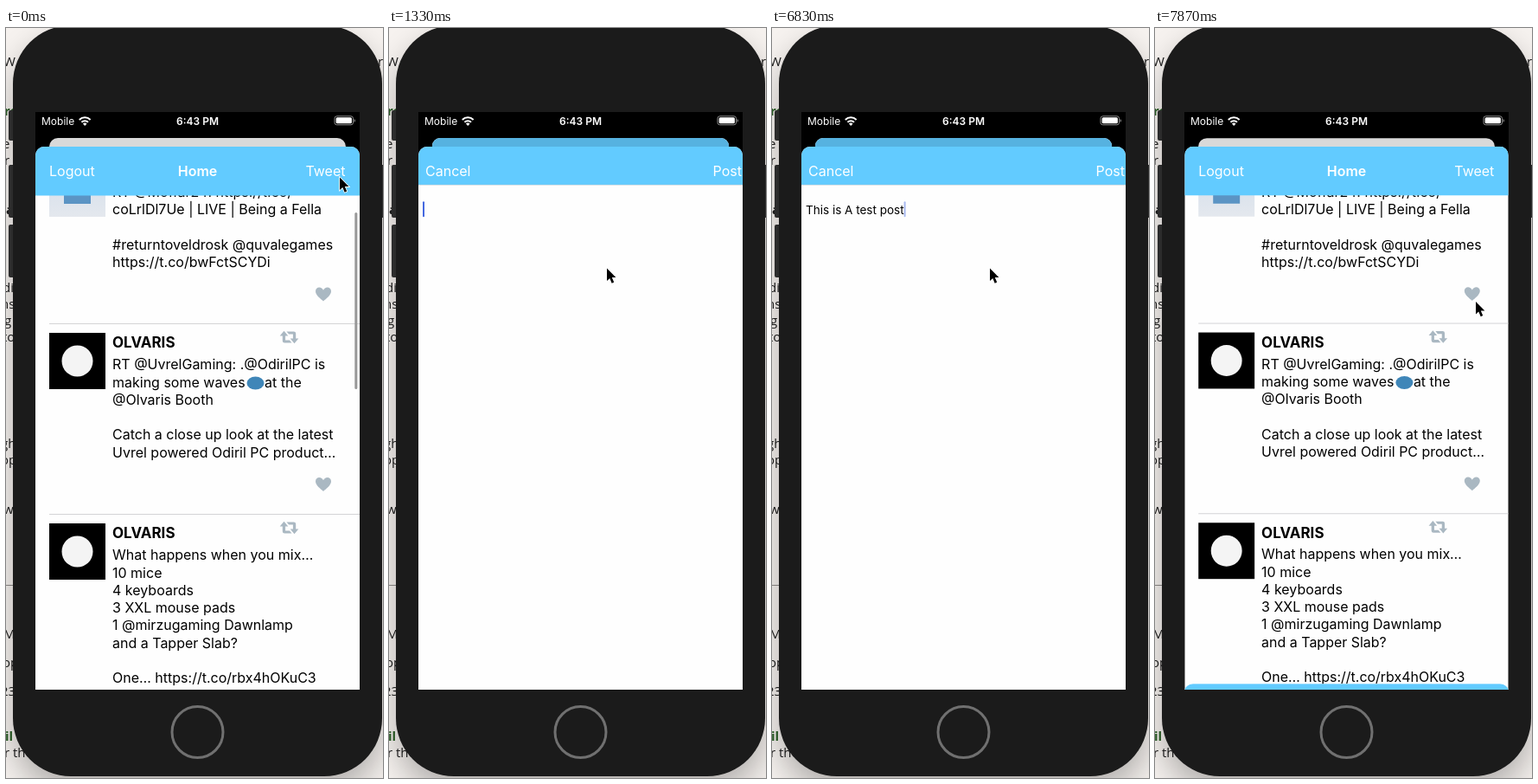
Animation of 436 by 866 pixels, one loop 8 s. Source, as an HTML page:

```html
<!DOCTYPE html>
<html lang="en">
<head>
<meta charset="utf-8">
<title>Compose a post</title>
<style>
  html, body { margin: 0; width: 100%; height: 100%; overflow: hidden; background: #e4e0dd; }
  svg { display: block; width: 436px; height: 866px; }
  text { font: 16px Inter, sans-serif; white-space: pre; }
  .page text { font: 15px "Open Sans", sans-serif; fill: #1c1c1c; }
  .page .b { font-weight: 700; }
  .page .g { font-weight: 700; fill: #2c6128; }
  .status { font-size: 12px; fill: #fff; }
  .bar { fill: #62cbff; }
  .nav { fill: #fff; }
  .semi { font-weight: 600; }
  .name { font-size: 17px; font-weight: 700; }
  .icon { fill: #aab8c2; }
  .draft { font-size: 13.5px; }
</style>
</head>
<body>
<svg viewBox="0 0 436 866">
  <defs>
    <filter id="shadow" x="-100" y="-100" width="640" height="1070" filterUnits="userSpaceOnUse">
      <feGaussianBlur stdDeviation="18"/>
    </filter>
    <linearGradient id="pale" x2="0" y2="1">
      <stop offset="0" stop-color="#cfdcea"/>
      <stop offset="1" stop-color="#e4e8ee"/>
    </linearGradient>
    <clipPath id="screen"><rect x="34" y="97" width="375" height="667"/></clipPath>
    <clipPath id="card"><rect x="34" y="137" width="375" height="680" rx="10"/></clipPath>
    <clipPath id="sheetTop"><rect x="34" width="375" height="680" rx="10"/></clipPath>
    <rect id="body" x="8" y="-3" width="427" height="867" rx="67"/>
    <g id="heart" class="icon">
      <path d="M0 8.2C-3 5.6-9 1.4-9-3.2C-9-6-7-7.6-4.8-7.6C-2.6-7.6-.8-6.2 0-4.4C.8-6.2 2.6-7.6 4.8-7.6C7-7.6 9-6 9-3.2C9 1.4 3 5.6 0 8.2Z"/>
    </g>
    <g id="share" class="icon">
      <path d="M-6-7.2L-10.8-1.6H-7.7V4.2Q-7.7 6.6-5.3 6.6H3L.4 3.4H-4.4V-1.6H-1.2Z"/>
      <path d="M6 7.2L10.8 1.6H7.7V-4.2Q7.7-6.6 5.3-6.6H-3L-.4-3.4H4.4V1.6H1.2Z"/>
    </g>
  </defs>

  <rect width="436" height="866" fill="#f6f2ef"/>
  <g class="page" id="page">
    <path d="M0 643.5H10" stroke="#8d8a88"/>
  </g>
  <use href="#body" y="18" opacity=".28" filter="url(#shadow)"/>

  <g fill="#2c2c2c">
    <rect x="3" y="95" width="8" height="35" rx="2"/>
    <rect x="3" y="158" width="8" height="61" rx="2"/>
    <rect x="3" y="227" width="8" height="61" rx="2"/>
    <rect x="432" y="158" width="8" height="61" rx="2"/>
  </g>
  <use href="#body" fill="#1b1b1b"/>
  <circle cx="221.5" cy="813" r="29.5" fill="none" stroke="#707070" stroke-width="3"/>

  <g clip-path="url(#screen)">
    <rect x="34" y="97" width="375" height="667"/>
    <text class="status" x="41" y="111.5">Mobile</text>
    <text class="status semi" x="221.5" y="111.5" text-anchor="middle">6:43 PM</text>
    <g fill="none" stroke="#fff" stroke-width="2">
      <path d="M84.8 106A9 9 0 0 1 97.6 106"/>
      <path d="M87.4 108.8A5.4 5.4 0 0 1 95 108.8"/>
    </g>
    <path d="M91.2 113L88.9 110.6A3.3 3.3 0 0 1 93.5 110.6Z" fill="#fff"/>
    <rect x="380" y="101.8" width="21.5" height="10" rx="2.6" fill="none" stroke="#8c8c8c"/>
    <rect x="381.6" y="103.3" width="18.3" height="7" rx="1.5" fill="#fff"/>
    <path d="M402.6 105V108.8Q404 108.3 404 106.9T402.6 105Z" fill="#8c8c8c"/>

    <rect id="rear" x="50" y="127" width="343" height="60" rx="10" fill="#d9d9d9"/>

    <g id="home" clip-path="url(#card)">
      <rect x="34" y="137" width="375" height="680" fill="#fefefe"/>
      <rect x="50" y="153" width="65" height="65" fill="url(#pale)"/>
      <rect x="67" y="172" width="31" height="31" fill="#5b94c4"/>
      <g id="feed"></g>
      <rect id="scroll" x="403.3" y="213" width="3" height="204" rx="1.5" fill="#989898"/>
      <rect class="bar" x="34" y="137" width="375" height="56.5"/>
      <text class="nav" x="50" y="171">Logout</text>
      <text class="nav semi" x="221.5" y="171" text-anchor="middle">Home</text>
      <text class="nav" id="tweet" x="392.5" y="171" text-anchor="end">Tweet</text>
      <rect id="dim" x="34" y="137" width="375" height="680"/>
    </g>

    <g id="sheet" clip-path="url(#sheetTop)">
      <rect x="34" width="375" height="680" fill="#fefefe"/>
      <rect class="bar" x="34" width="375" height="44"/>
      <path d="M34 44.3H409" stroke="#b9c6ce" stroke-width=".6"/>
      <text class="nav" x="42" y="34">Cancel</text>
      <text class="nav" id="post" x="374.5" y="34">Post</text>
      <text class="draft" id="draft" x="39" y="77.5"></text>
      <rect id="caret" y="63.3" width="2" height="18" rx="1" fill="#4468e0"/>
    </g>
  </g>

  <path id="cursor" d="M0 0V14.6L3.3 11.5L5.7 17.2L8.2 16.1L5.8 10.6H10.4Z" stroke="#fff" stroke-width="1.6" paint-order="stroke"/>
</svg>

<script>
const $ = id => document.getElementById(id);

function add(parent, tag, attrs, text = '') {
  const el = document.createElementNS('http://www.w3.org/2000/svg', tag);
  for (const key in attrs) el.setAttribute(key, attrs[key]);
  el.textContent = text;
  parent.append(el);
}

// Clipped text of the page behind the phone
[
  [39, 'W', -3], [96, 're', -2, 'g'], [134, 'e', -4], [153, 'r t', -2],
  [210, 'a', 0, 'b'], [300, 'di', -4], [319, 'ns', -6], [338, 'g', -2],
  [357, 'to', -4], [480, 'gh', -6], [499, 'op', -6], [556, 'w', -3],
  [700, 'M', -3], [733, 'op', -4], [766, '23', -6], [818, 'il', -1, 'g'],
  [837, 'r the', -2], [39, 'r', 430]
].forEach(([y, s, x, cls = '']) => add($('page'), 'text', { x, y: y + 5, class: cls }, s));

const LINE = 20.3;
const cells = [
  [142.3, ['RT @Moffar24: https://t.co/', 'coLrlDl7Ue | LIVE | Being a Fella', '',
    '#returntoveldrosk @quvalegames', 'https://t.co/bwFctSCYDi']],
  [341.5, ['RT @UvrelGaming: .@OdirilPC is', 'making some waves', '@Olvaris Booth', '',
    'Catch a close up look at the latest', 'Uvrel powered Odiril PC product…']],
  [561.5, ['What happens when you mix…', '10 mice', '4 keyboards', '3 XXL mouse pads',
    '1 @mirzugaming Dawnlamp', 'and a Tapper Slab?', '', 'One… https://t.co/rbx4hOKuC3']]
];
const feed = $('feed');
cells.forEach(([top, lines], i) => {
  const first = top + 52.7;
  lines.forEach((s, n) => add(feed, 'text', { x: 123, y: first + n * LINE }, s));
  add(feed, 'use', { href: '#heart', x: 367, y: first + (lines.length - 1) * LINE + 31 });
  if (!i) return;
  add(feed, 'path', { d: `M50 ${top}H409`, stroke: '#d4d4d6' });
  add(feed, 'rect', { x: 50, y: top + 10.5, width: 65, height: 65 });
  add(feed, 'circle', { cx: 82.5, cy: top + 43, r: 18, fill: '#f4f4f4' });
  add(feed, 'text', { x: 123, y: top + 27.8, class: 'name' }, 'OLVARIS');
  add(feed, 'use', { href: '#share', x: 327.5, y: top + 15.5 });
});
add(feed, 'ellipse', { cx: 288.5, cy: 410, rx: 10, ry: 7.5, fill: '#3f86b8' });
add(feed, 'text', { x: 299, y: 341.5 + 52.7 + LINE }, 'at the');

// Timelines: [tick, value], held until the next entry
const typed = [
  [0, ''], [14, 'T'], [15, 'Th'], [16, 'Thi'], [17, 'This'], [18, 'This '], [19, 'This is'],
  [22, 'This is '], [23, 'This is  '], [27, 'This is'], [29, 'This is '], [30, 'This is A'],
  [31, 'This is A '], [33, 'This is A t'], [34, 'This is A te'], [35, 'This is A test'],
  [37, 'This is A test '], [41, 'This is A test po'], [42, 'This is A test post']
];
const caretAlpha = [[0, 0], [9, 1], [13, .5], [14, 1], [46, .45], [47, 0]];
const tweetAlpha = [[0, 1], [1, .4], [3, 1]];
const postAlpha = [[0, 1], [50, .3]];
const scrollAlpha = [[0, 1], [1, .5], [2, 0]];
const pointer = [
  [0, [386, 172.5]], [3, null], [6, [335, 215]], [7, [285, 255]], [8, [254, 276]],
  [9, [252, 277.5]], [47, [290, 240]], [48, [355, 187]], [49, [389, 159]],
  [50, [390.5, 157.5]], [52, [387, 212]], [53, [371, 316]]
];
const at = (list, k) => list.findLast(entry => entry[0] <= k)[1];

// Critically damped spring: part of the way still to go
const rest = u => u > 0 ? (1 + u) * Math.exp(-u) : 1;

const TICK = 148.3, LOOP = 8000, RATE = 2.45;

function draw(k) {
  const shown = k < 30 ? 1 - rest((k - 1.22) * RATE) : rest((k - 50.502) * RATE);
  const scale = 1 - .0853 * shown;
  $('home').setAttribute('transform',
    `translate(221.5 ${137 - 10 * shown}) scale(${scale}) translate(-221.5 -137)`);
  $('rear').setAttribute('transform', `translate(0 ${10 * shown})`);
  $('dim').setAttribute('opacity', .12 * shown);
  $('sheet').setAttribute('transform', `translate(0 ${137 + 630 * (1 - shown)})`);

  const text = at(typed, k);
  $('draft').textContent = text;
  const width = text ? $('draft').getComputedTextLength() : 0;
  $('caret').setAttribute('x', 39 + width);
  $('caret').setAttribute('opacity', at(caretAlpha, k));
  $('tweet').setAttribute('opacity', at(tweetAlpha, k));
  $('post').setAttribute('opacity', at(postAlpha, k));
  $('scroll').setAttribute('opacity', at(scrollAlpha, k));

  const spot = at(pointer, k);
  $('cursor').setAttribute('visibility', spot ? 'visible' : 'hidden');
  if (spot) $('cursor').setAttribute('transform', `translate(${spot})`);
}

const start = performance.now();
function loop() {
  const t = (performance.now() - start) % LOOP;
  draw(Math.floor((t + 9) / TICK));
  requestAnimationFrame(loop);
}
loop();
</script>
</body>
</html>
```
